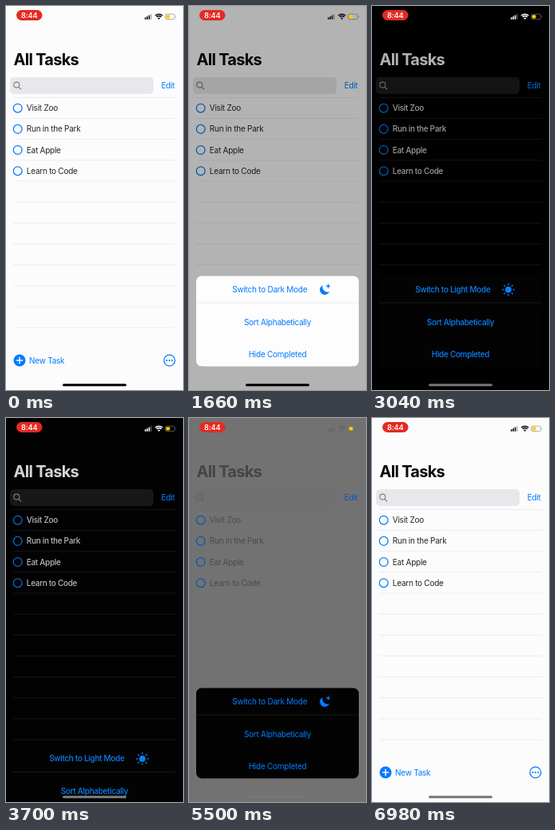
Animation, 222 px wide and 480 px high, one loop 7000 ms. Source, as an HTML page:

```html
<!DOCTYPE html>
<html lang="en">
<head>
<meta charset="utf-8">
<title>Task list</title>
<style>
html, body { margin: 0; width: 100%; height: 100%; overflow: hidden; background: #fcfcfc; }
svg { display: block; width: 222px; height: 480px; }
text { font: var(--weight) 10px Inter, "Open Sans", sans-serif; letter-spacing: var(--track); fill: var(--fg); }
.title { font-size: 20px; font-weight: 700; letter-spacing: -.72px; }
.clock { font-size: 9.2px; font-weight: 600; letter-spacing: -.2px; fill: #fff; }
.mid { text-anchor: middle; }
.blue { fill: var(--blue); }
.ring { fill: none; stroke: var(--blue); stroke-width: 1.25; }
.line { stroke: var(--line); stroke-width: .8; }
.ink { fill: var(--ink); }
.wave { fill: none; stroke: var(--ink); stroke-width: 1.5; }
</style>
</head>
<body>
<svg viewBox="0 0 222 480">
  <rect width="222" height="480" fill="var(--bg)"/>
  <text class="title" x="9.5" y="73.5">All Tasks</text>
  <rect x="5" y="89" width="180" height="21" rx="5" fill="var(--field)"/>
  <g fill="none" stroke="var(--hint)" stroke-width="1.1" stroke-linecap="round">
    <circle cx="13.3" cy="98.6" r="3.5"/>
    <path d="M16 101.3l2.7 2.7"/>
  </g>
  <text class="blue" x="194.8" y="103">Edit</text>
  <g id="list"></g>
  <circle class="blue" cx="17" cy="443" r="7.5"/>
  <path d="M17 439.3v7.4M13.3 443h7.4" stroke="var(--bg)" stroke-width="1.5" stroke-linecap="round"/>
  <text class="blue" x="29" y="446.7">New Task</text>
  <circle class="ring" cx="205" cy="443" r="6.9"/>
  <g class="blue">
    <circle cx="201.6" cy="443" r="1.1"/><circle cx="205" cy="443" r="1.1"/><circle cx="208.4" cy="443" r="1.1"/>
  </g>

  <rect id="dim" width="222" height="480"/>

  <g id="sheet">
    <rect x="9" y="337.5" width="204" height="113" rx="7" fill="var(--sheet)"/>
    <path d="M9 371h204" stroke="var(--sheetLine)" stroke-width=".8"/>
    <g id="mode">
      <text id="label" class="blue mid" x="101.3" y="358"></text>
      <g id="moon" class="blue">
        <path d="M167.6 349.2A6.2 6.2 0 1 0 176 357.2A6.6 6.6 0 0 1 167.6 349.2Z"/>
        <path d="M174.6 347.6v5.2M172 350.2h5.2" stroke="var(--blue)" stroke-width="1.3"/>
      </g>
      <g id="sun" class="blue"><circle cx="171" cy="354.5" r="3.9"/></g>
    </g>
    <text class="blue mid" x="111" y="398.7">Sort Alphabetically</text>
    <text class="blue mid" x="111" y="438.7">Hide Completed</text>
  </g>

  <rect x="13" y="5" width="32.5" height="13" rx="6.5" fill="#e52a22"/>
  <text class="clock mid" x="29.2" y="14.8">8:44</text>
  <g class="ink">
    <rect x="174" y="14.2" width="1.6" height="2.6" rx=".4"/>
    <rect x="176.4" y="12.9" width="1.6" height="3.9" rx=".4"/>
    <rect x="178.8" y="11.4" width="1.6" height="5.4" rx=".4"/>
    <rect x="181.2" y="10" width="1.6" height="6.8" rx=".4" opacity=".3"/>
    <path d="M191.8 17l-1.6-1.7a2.3 2.3 0 0 1 3.2 0z"/>
  </g>
  <path class="wave" d="M188.8 13.8a4.3 4.3 0 0 1 6 0M187.2 12a6.6 6.6 0 0 1 9.2 0"/>
  <rect x="199.7" y="10.2" width="12" height="6.4" rx="1.9" fill="none" stroke="var(--ink)" stroke-width=".7" opacity=".45"/>
  <path d="M212.8 12.2a1.5 1.5 0 0 1 0 2.4z" class="ink" opacity=".45"/>
  <rect x="200.7" y="11.2" width="4.8" height="4.4" rx="1" fill="#fc0"/>
  <rect x="71" y="472.3" width="80" height="3" rx="1.5" fill="var(--home)"/>
</svg>
<script>
const LOOP = 7000;
const $ = id => document.getElementById(id);
const root = document.documentElement.style;

// [time, value] steps; values between steps are interpolated
const pageDark = [[1900, 0], [2060, 1], [5400, 1], [5560, 0]];
const sheetDark = [[2040, 0], [2240, 1], [5540, 1], [5740, 0]];
const sheetOpen = [[250, 0], [650, 1], [3620, 1], [4020, 0], [4620, 0], [5020, 1], [6440, 1], [6840, 0]];
const homeTone = [[1920, 0], [2060, 118], [3680, 118], [4000, 255], [4700, 255], [5000, 118]];

// light and dark values of each colour
const pageColors = {
  bg: [[252, 252, 252], [2, 2, 2]],
  fg: [[8, 8, 9], [250, 250, 250]],
  ink: [[12, 12, 12], [255, 255, 255]],
  line: [[233, 233, 235], [32, 32, 34]],
  field: [[232, 231, 235], [28, 28, 30]],
  hint: [[128, 128, 132], [150, 150, 155]],
  blue: [[0, 122, 255], [10, 128, 250]]
};
const sheetColors = {
  sheet: [[253, 253, 254], [3, 3, 3]],
  sheetLine: [[232, 232, 235], [30, 30, 32]]
};

const clamp = x => Math.min(1, Math.max(0, x));
const linear = x => x;
const glide = x => 1 - Math.pow(1 - x, 3);

function valueAt(steps, t, ease = linear) {
  const next = steps.findIndex(s => s[0] > t);
  if (next === 0) return steps[0][1];
  if (next < 0) return steps[steps.length - 1][1];
  const [t0, a] = steps[next - 1], [t1, b] = steps[next];
  return a + (b - a) * ease(clamp((t - t0) / (t1 - t0)));
}

function paint(colors, k) {
  for (const [name, [a, b]] of Object.entries(colors)) {
    const rgb = a.map((v, i) => Math.round(v + (b[i] - v) * k));
    root.setProperty("--" + name, `rgb(${rgb})`);
  }
}

function buildList() {
  const tasks = ["Visit Zoo", "Run in the Park", "Eat Apple", "Learn to Code"];
  let html = "";
  for (let i = 0; i < 12; i++) {
    const y = 114.4 + i * 26.15;
    html += `<path class="line" d="M9 ${y}H213"/>`;
    if (tasks[i]) {
      html += `<circle class="ring" cx="14.7" cy="${y + 13.3}" r="5.4"/>
        <text x="25.8" y="${y + 16.9}" fill-opacity=".88">${tasks[i]}</text>`;
    }
  }
  $("list").innerHTML = html;
}

function buildSun() {
  let d = "";
  for (let i = 0; i < 8; i++) {
    const c = Math.cos(i * Math.PI / 4), s = Math.sin(i * Math.PI / 4);
    d += `M${171 + 6.3 * c} ${354.5 + 6.3 * s}l${1.1 * c} ${1.1 * s}`;
  }
  $("sun").innerHTML += `<path d="${d}" stroke="var(--blue)" stroke-width="1.4" stroke-linecap="round"/>`;
}

function render(t) {
  const dark = valueAt(pageDark, t), shade = valueAt(sheetDark, t);
  const open = valueAt(sheetOpen, t, glide);
  const home = Math.round(valueAt(homeTone, t));
  paint(pageColors, dark);
  paint(sheetColors, shade);
  root.setProperty("--home", `rgb(${home},${home},${home})`);
  root.setProperty("--weight", dark > .5 ? 500 : 400);
  root.setProperty("--track", dark > .5 ? "-.32px" : "-.25px");

  const toLight = dark > .5, fading = shade > 0 && shade < 1;
  const label = !toLight ? "Switch to Dark Mode" : fading ? "Switch to Light Mo…" : "Switch to Light Mode";
  if ($("label").textContent !== label) $("label").textContent = label;
  $("moon").style.display = toLight ? "none" : "";
  $("sun").style.display = toLight ? "" : "none";
  $("mode").setAttribute("opacity", fading ? .5 + .5 * shade : 1);

  $("dim").setAttribute("opacity", .29 * open);
  $("sheet").setAttribute("transform", `translate(0 ${145 * (1 - open)})`);
}

function tick() {
  render(performance.now() % LOOP);
  requestAnimationFrame(tick);
}

buildList();
buildSun();
render(0);
requestAnimationFrame(tick);
</script>
</body>
</html>
```
